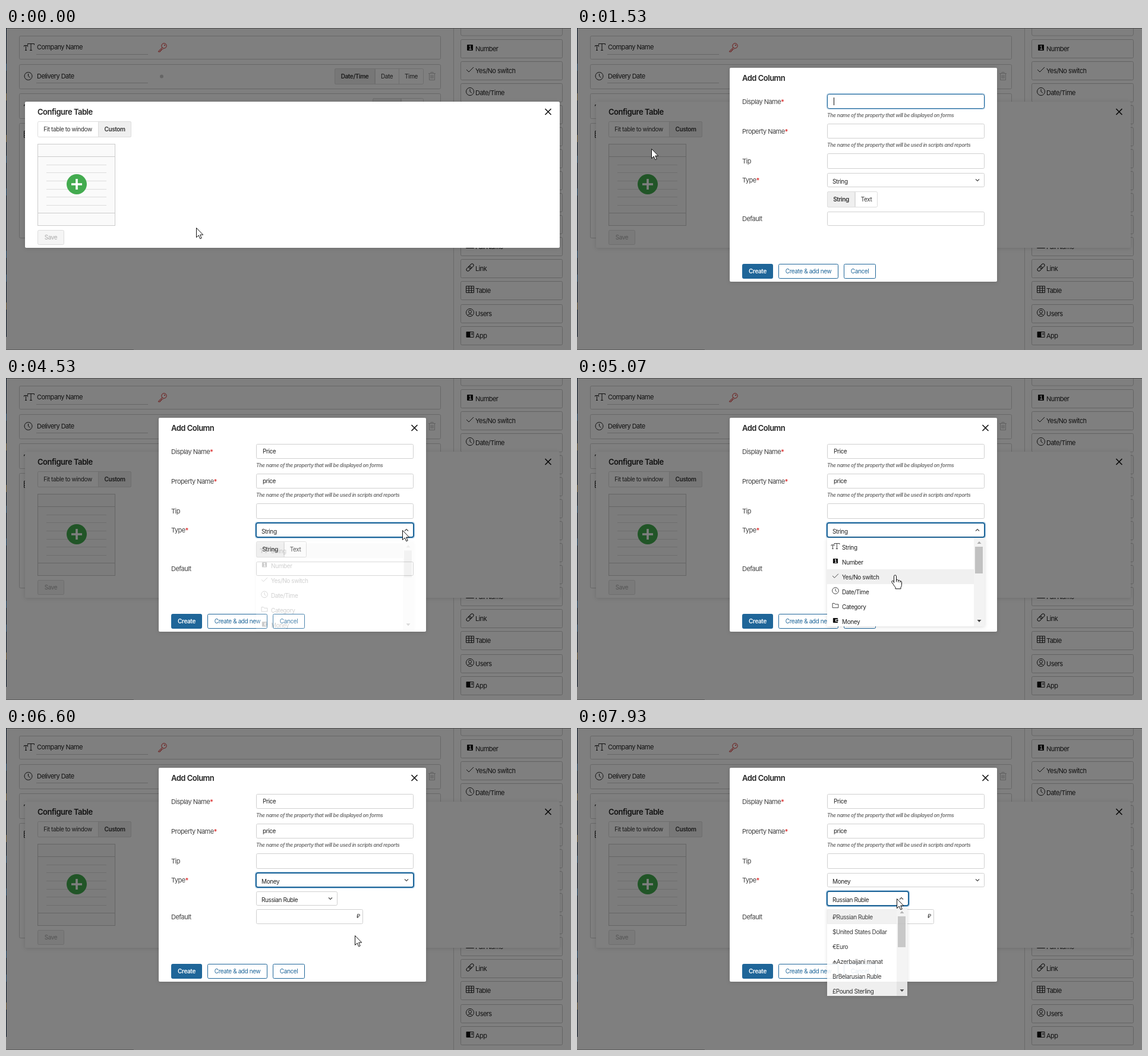
Write an HTML page that moves like this. It is 951 px wide and 542 px high and loops after 8 s.

```html
<!DOCTYPE html>
<html lang="en">
<head>
<meta charset="utf-8">
<title>Add column</title>
<style>
html, body { margin: 0; width: 100%; height: 100%; overflow: hidden; background: #808080; }
svg { display: block; font-family: Inter, Roboto, "DejaVu Sans", sans-serif; white-space: pre; }
.shadow { filter: drop-shadow(0 1px 3px rgba(0,0,0,.14)); }
</style>
</head>
<body>
<svg id="stage" width="951" height="542" viewBox="0 0 951 542"></svg>
<script>
const LOOP = 8000, BLUE = '#1f6699', HALO = '#a9cbe6', BORDER = '#d0d0d0', INK = '#222';
const SPACING = {13: -.5, 11: -.55, 10: -.4, 9: -.3, 8.5: -.35};

const clamp = v => Math.max(0, Math.min(1, v));
const ramp = (t, from, to) => clamp((t - from) / (to - from));
const ease = v => v * v * (3 - 2 * v);

const fillRect = (x, y, w, h, fill, r = 0) =>
  `<rect x="${x}" y="${y}" width="${w}" height="${h}" rx="${r}" fill="${fill}"/>`;
const box = (x, y, w, h, fill = '#fff', stroke = BORDER, r = 2) =>
  `<rect x="${x + .5}" y="${y + .5}" width="${w - 1}" height="${h - 1}" rx="${r}" fill="${fill}" stroke="${stroke}"/>`;
// Outline whose middle lies d pixels outside a box
const outline = (x, y, w, h, d, color, width) =>
  `<rect x="${x - d}" y="${y - d}" width="${w + 2 * d}" height="${h + 2 * d}" rx="3" fill="none" stroke="${color}" stroke-width="${width}"/>`;
const line = (d, color, width = 1) =>
  `<path d="${d}" fill="none" stroke="${color}" stroke-width="${width}"/>`;
const text = (x, y, s, size = 11, fill = INK, weight = 400, extra = '') =>
  `<text x="${x}" y="${y}" font-size="${size}" fill="${fill}" font-weight="${weight}" letter-spacing="${SPACING[size]}" ${extra}>${s}</text>`;
const group = (x, y, body, extra = '') => `<g transform="translate(${x} ${y})" ${extra}>${body}</g>`;

// Icons are centred on 0,0
const stroke = d => line(d, '#222');
const solid = d => `<path d="${d}" fill="#111"/>`;
const ring = r => `<circle r="${r}" fill="none" stroke="#222"/>`;
const ICONS = {
  text: stroke('M-8.500-.5v-2h6v2M-5.500-2.500v8M-7 5.500h3M-2.500-3.500v-2h11v2M3-5.500v11M1 5.500h4'),
  number: fillRect(-5, -5, 10, 10, '#111', 1) + line('M-1.500-2l2-1v6M-1.500 3h4', '#fff', 1.3),
  check: stroke('M-6 0l4 4 8-8'),
  clock: ring(6.5) + stroke('M0-4v4l3 2.500'),
  folder: stroke('M-6 4.500v-9h4l1.500 2h6.500v7z'),
  money: fillRect(-5, -5, 10, 10, '#111', 1) + fillRect(0, -2.5, 6, 5, '#fff') + solid('M1.500-1.500h4v3h-4z'),
  phone: stroke('M-5-5l2-1 2 3-1.500 1.500q1 3 4 4l1.500-1.500 3 2-1 2q-3 2-7-2t-3-8z'),
  mail: fillRect(-6.5, -5, 13, 10, '#111', 1) + line('M-6-3.500l6 4 6-4', '#fff'),
  image: fillRect(-6, -5, 12, 10, '#111', 1) + '<path d="M-4 3l2.500-3 2 1.500 2-3 2 4.500zM-4-3h2v2h-2z" fill="#fff"/>',
  file: stroke('M-4-6h5l3 3v9h-8zM-2-1h4M-2 1h4M-2 3h4'),
  card: stroke('M-6.500-5h13v9.500h-13zM-4 2h4M2-2h3M2 0h3'),
  link: `<g transform="rotate(-45)" fill="none" stroke="#222"><rect x="-7.500" y="-2.500" width="9" height="5" rx="2.500"/><rect x="-1.500" y="-2.500" width="9" height="5" rx="2.500"/></g>`,
  table: stroke('M-6.500-5.500h13v11h-13zM-6.500-2h13M-6.500 2h13M-2-5.500v11M2.500-5.500v11'),
  user: ring(6.5) + '<circle cy="-1.500" r="2.500" fill="none" stroke="#222"/>' + stroke('M-4 4.500q4-4 8 0'),
  app: stroke('M-6-4.500h12v9h-12z') + solid('M-6-4.500h6.500v9h-6.500z') + stroke('M2-2h3M2 0h3'),
  key: line('M0 0l-6.500 6v1h3v-2h2v-2h2l1-1', '#d33') + '<circle cx="3" cy="-3" r="4.200" fill="none" stroke="#d33"/><circle cx="4" cy="-4" r="1" fill="#d33"/>',
  trash: line('M-6-4.500h12M-2-4.500v-2h4v2M-4.500-4.500v11h9v-11M-2-2v6M0-2v6M2-2v6', '#c4c4c4')
};
const icon = (name, x, y, scale = 1) => `<g transform="translate(${x} ${y}) scale(${scale})">${ICONS[name]}</g>`;

const TYPES = [['text', 'String'], ['number', 'Number'], ['check', 'Yes/No switch'], ['clock', 'Date/Time'],
  ['folder', 'Category'], ['money', 'Money'], ['phone', 'Phone number'], ['mail', 'Email address'],
  ['image', 'Image'], ['file', 'Files'], ['card', 'Full Name'], ['link', 'Link'], ['table', 'Table'],
  ['user', 'Users'], ['app', 'App']];
const CURRENCIES = ['₽Russian Ruble', '$United States Dollar', '€Euro', '₼Azerbaijani manat',
  'BrBelarusian Ruble', '£Pound Sterling'].map(s => [null, s]);

const closeMark = (x, y) => line(`M${x - 5} ${y - 5}l10 10m0-10l-10 10`, '#111', 1.6);

// Segmented switch: edges, labels, index of the chosen part
function segments(edges, y, labels, chosen) {
  const end = edges[edges.length - 1];
  return box(edges[0], y, end - edges[0], 27, '#fff', '#ddd') + labels.map((s, i) => {
    const x = edges[i], w = edges[i + 1] - x, on = i === chosen;
    return (on ? box(x, y, w, 27, '#efefef', '#ddd') : i ? line(`M${x + .5} ${y}v27`, '#ddd') : '') +
      text(x + w / 2, y + 17, s, 10, '#333', on ? 600 : 400, 'text-anchor="middle"');
  }).join('');
}

function makePage() {
  let s = fillRect(0, 0, 951, 542, '#fff') + fillRect(0, 0, 951, 1, '#999') + fillRect(0, 541, 215, 1, '#bbb');
  s += fillRect(0, 0, 1, 520, '#16304e');
  for (const y of [60, 215, 270, 375, 415]) s += fillRect(0, y, 1, 12, '#2f7fc4');
  for (const y of [110, 180, 462]) s += fillRect(0, y, 1, 12, '#c9a25a');
  s += line('M753.500 1v541', '#d5d5d5');
  for (const [y, h] of [[13, 40], [61, 42], [110, 43], [160, 194]]) s += box(22, y, 710, h);
  s += icon('text', 39, 32) + text(52, 36, 'Company Name') + line('M51 44.500h188', BORDER) + icon('key', 263, 33);
  s += icon('clock', 37.5, 81) + text(52, 85, 'Delivery Date') + line('M51 92.500h188', BORDER);
  s += '<circle cx="262" cy="81.500" r="3" fill="#ccc"/>' + icon('trash', 717, 81);
  s += segments([553, 621, 661, 703], 68, ['Date/Time', 'Date', 'Time'], 0);
  s += segments([617, 665, 703], 118, ['String', 'Text'], 0) + icon('text', 39, 132) + icon('table', 37, 179);
  s += line('M765.500 1v9q0 3 3 3h165q3 0 3-3v-9', BORDER);
  TYPES.slice(1).forEach(([name, label], i) => {
    const y = 19 + i * 37 + (i > 11 ? 2 : 0);
    s += box(765, y, 172, 32, '#fff', '#c8c8c8') + icon(name, 781, y + 14) + text(790, y + 20, label);
  });
  return s;
}

function makeTableDialog() {
  let s = `<g class="shadow">${fillRect(32, 124, 900, 246, '#fff', 2)}</g>`;
  s += text(53, 146, 'Configure Table', 13, INK, 600) + closeMark(912.5, 141);
  s += segments([53, 155, 211], 157, ['Fit table to window', 'Custom'], 1);
  s += box(53, 195, 131, 138, '#fafafa', '#ccc', 0) + line('M53 216.500h131M53 311.500h131', '#ccc');
  for (const y of [230, 243, 257, 271, 284, 298]) s += line(`M68 ${y + .5}h101`, '#ddd');
  s += '<circle cx="119" cy="263" r="17" fill="#43ab4f"/>' + line('M110 263h18M119 254v18', '#fff', 3.6);
  return s + box(53, 340, 45, 25, '#f5f5f5', '#ddd') + text(75.5, 356, 'Save', 10, '#aaa', 400, 'text-anchor="middle"');
}

function field(x, y, w, h, focus = 0) {
  return box(x, y, w, h) + `<g opacity="${focus}">` +
    outline(x, y, w, h, .5, HALO, 1) + outline(x, y, w, h, -.5, BLUE, 1) + '</g>';
}
function select(x, y, w, value, focus, open) {
  const cx = x + w - 12, cy = y + 12;
  return box(x, y, w, 24) + `<g opacity="${focus}">` +
    outline(x, y, w, 24, 1.5, HALO, 1) + outline(x, y, w, 24, 0, BLUE, 2) + '</g>' +
    text(x + 9, y + 17.6, value, 10) +
    line(open ? `M${cx - 3} ${cy + 1.5}l3-3 3 3` : `M${cx - 3} ${cy - 1.5}l3 3 3-3`, '#444', 1.1);
}

// Drop-down list that slides up 8px while it fades in
function menu(x, y, w, rows, shown, active, scroll, thumb) {
  if (!shown) return '';
  const id = 'clip' + x + y, bar = x + w - 18, mid = bar + 9;
  const list = rows.map(([name, label], i) => {
    const top = y + 3 + i * 25 - scroll;
    if (top > y + 149 || top < y - 25) return '';
    return (i === active ? fillRect(x, top, w, 25, '#f0f0f0') : '') +
      (name ? icon(name, x + 14, top + 11, .82) : '') + text(x + (name ? 25 : 9), top + 17, label, 10);
  }).join('');
  const up = scroll ? '#444' : '#aaa';
  return group(0, 8 * (1 - shown),
    `<clipPath id="${id}"><rect x="${x}" y="${y}" width="${w}" height="149"/></clipPath>` +
    `<g class="shadow">${fillRect(x, y, w, 149, '#fff')}</g><g clip-path="url(#${id})">${list}</g>` +
    fillRect(bar, y, 18, 149, '#f3f3f3') + fillRect(bar + 2, y + 15 + scroll * .31, 13, thumb, '#c1c1c1') +
    `<path d="M${mid - 3.5} ${y + 10}l3.500-4 3.500 4z" fill="${up}"/>` +
    `<path d="M${mid - 3.5} ${y + 138}l3.500 4 3.500-4z" fill="#444"/>`, `opacity="${shown}"`);
}

const button = (x, w, label, fill, ink, weight) =>
  box(x, 397, w, 25, fill, BLUE) + text(x + w / 2, 413, label, 10, ink, weight, 'text-anchor="middle"');

function form(t, [, my]) {
  const label = (y, s, must) =>
    text(278, y, s + (must ? '<tspan fill="#d33" font-weight="600">*</tspan>' : ''), 11, '#444');
  const hint = (y, s) => text(421, y, s, 8.5, '#707070', 600, 'font-style="italic"');
  const typed = t < 2600 ? 0 : Math.min(5, 1 + Math.floor((t - 2600) / 100));
  const nameFocus = 1 - ramp(t, 3900, 4000);
  const moneyFocus = ramp(t, 7090, 7330);
  const typeFocus = ramp(t, 4160, 4330) * (1 - moneyFocus);
  const caret = t < 2060 || (t >= 2600 && t < 3530);
  const money = t >= 6270;
  const typesShown = Math.min(ramp(t, 4490, 4690), 1 - ramp(t, 6230, 6400));
  const moneyShown = ramp(t, 7755, 7955);
  const scroll = 100 * ease(ramp(t, 5230, 5540));
  const hover = my > 272 ? Math.floor((my - 272 + scroll) / 25) : 0;

  let s = `<g class="shadow">${fillRect(257, 67, 450, 360, '#fff', 2)}</g>` + text(278, 89, 'Add Column', 13, INK, 600);
  if (t >= 1600) s += closeMark(687.5, 84);
  s += label(128, 'Display Name', 1) + field(421, 111, 265, 25, nameFocus) + text(432, 127, 'Price'.slice(0, typed), 10);
  if (caret) s += fillRect(432 + [0, 6, 9.4, 11.4, 16.8, 22][typed], 117, 1, 13, '#111');
  s += hint(150, 'The name of the property that will be displayed on forms');
  s += label(178, 'Property Name', 1) + field(421, 161, 265, 25) + text(432, 177, 'price'.slice(0, typed), 10);
  s += hint(200, 'The name of the property that will be used in scripts and reports');
  s += label(228, 'Tip') + field(421, 211, 265, 26) + label(260, 'Type', 1);
  s += select(421, 244, 265, t < 6130 ? 'String' : 'Money', typeFocus, t >= 4490 && t < 6130);
  s += label(money ? 322 : 325, 'Default');
  if (money) {
    s += select(421, 275, 137, 'Russian Ruble', moneyFocus, t >= 7780);
    s += field(421, 305, 180, 25) + text(590, 320, '₽', 9);
  } else {
    s += segments([421, 468, 506], 275, ['String', 'Text'], 0) + field(421, 309, 265, 24);
  }
  s += button(278, 52, 'Create', BLUE, '#fff', 600) + button(339, 101, 'Create &amp; add new', '#fff', BLUE, 400) +
    button(449, 54, 'Cancel', '#fff', BLUE, 400);
  return s + menu(421, 269, 265, TYPES, typesShown, hover, scroll, 45) +
    menu(421, 301, 135, CURRENCIES, moneyShown, 0, 0, 52);
}

// Pointer stops: time, x, y
const PATH = [[0, 320, 336], [40, 320, 336], [330, 127, 260], [630, 127, 260], [800, 88, 258], [980, 131, 192],
  [1130, 125, 203], [1560, 125, 203], [2130, 274, 228], [2240, 274, 228], [2270, 275, 231], [2750, 275, 231],
  [3270, 673, 249], [4150, 673, 249], [4330, 667, 256], [4640, 667, 256], [5130, 530, 335], [5300, 530, 335],
  [5580, 512, 326], [5620, 512, 326], [5800, 482, 308], [6270, 482, 308], [6580, 587, 349], [6650, 587, 349],
  [7070, 538, 287], [LOOP, 538, 287]];
const HAND = [[250, 1530], [3230, 4200], [4780, 6270], [6950, 7200]];

function pointerAt(t) {
  const i = PATH.findIndex(p => p[0] > t), [t0, x0, y0] = PATH[i - 1], [t1, x1, y1] = PATH[i];
  const k = ease(ramp(t, t0, t1));
  return [x0 + (x1 - x0) * k, y0 + (y1 - y0) * k];
}
function pointer(t, [x, y]) {
  const hand = HAND.some(([a, b]) => t >= a && t < b);
  const d = hand
    ? 'M-2 13V2q0-2 2-2t2 2v6q2.500-1 3.300.8 2.500-.8 3.200 1.200 2.500-.4 2.500 2v4.500q0 2.500-1.500 4v2.500h-9v-2.500q-2-2-3.300-4.500l-2.700-4q-.8-2 .6-2.300t2.900 1.300z'
    : 'M.5.500v16l3.700-3.500 2.500 5.700 2.500-1-2.500-5.600h5z';
  return group(x, y, `<path d="${d}" fill="#fff" stroke="#111" stroke-linejoin="round"/>` +
    (hand ? line('M2 8v3.500M5.300 9v3M8.500 10v2.500', '#111') : ''));
}

const stage = document.getElementById('stage');
const page = makePage(), tableDialog = makeTableDialog();
const shade = fillRect(0, 0, 951, 542, 'rgba(0,0,0,.5)');
const start = performance.now();

function draw() {
  const t = (performance.now() - start) % LOOP, at = pointerAt(t);
  stage.innerHTML = page +
    (t < 1530 ? shade + tableDialog : tableDialog + shade + form(t, at)) + pointer(t, at);
  requestAnimationFrame(draw);
}
draw();
</script>
</body>
</html>
```
